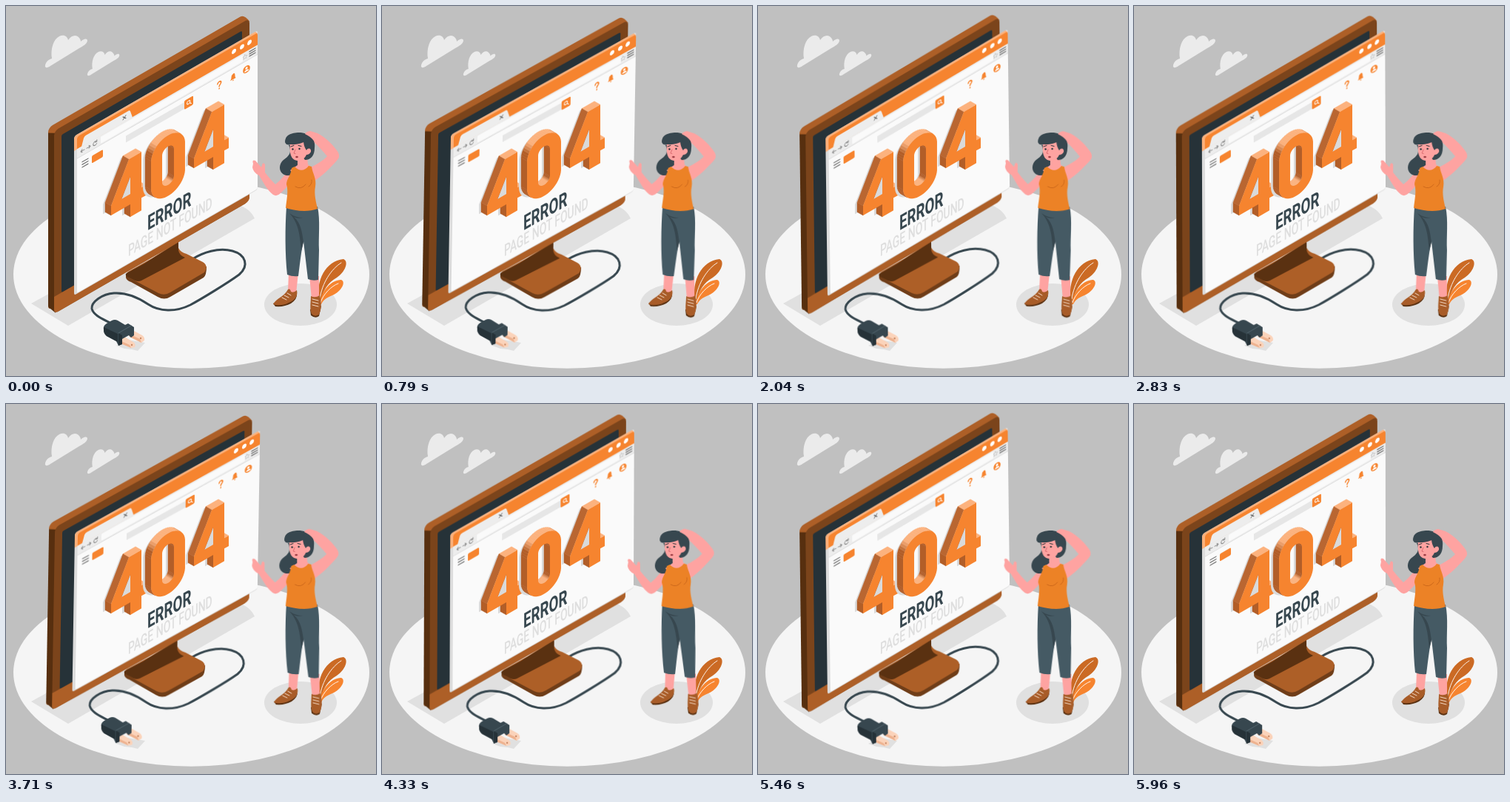
These frames come from a looping animation (500x500 px, 6 s). An HTML page:

```html
<!DOCTYPE html>
<html lang="en">
<head>
<meta charset="utf-8">
<title>404 error</title>
<style>
html, body { margin: 0; width: 100%; height: 100%; overflow: hidden; background: #c0c0c0; }
svg { display: block; width: 100vw; height: 100vh; }
text { font-family: Roboto, "Liberation Sans", sans-serif; }
.sway { transform-box: view-box; }
.line { fill: none; stroke-linecap: round; stroke-linejoin: round; }
</style>
</head>
<body>
<svg viewBox="0 0 500 500">
  <defs>
    <path id="cloud" fill="#ebebeb" d="M53 80C54 75 58 72 62 71C60 58 64 45 72 41C78 38 83 41 84 46C88 40 94 38 98 42C100 44 101 46 101 48C105 44 110 43 110 47C109 52 104 54 99 57L60 81C56 84 52 84 53 80Z"/>
  </defs>

  <ellipse cx="250.5" cy="362.7" rx="240.5" ry="127" fill="#f5f5f5"/>
  <use href="#cloud"/>
  <use href="#cloud" transform="translate(69.7 31) scale(.76)"/>
  <path fill="#e0e0e0" d="M34 402L290 262Q328 268 336 287L84 432Z"/>
  <path fill="#e0e0e0" d="M149 459L164 451L188 455L178 466L170 464L160 463Z"/>
  <ellipse cx="398" cy="403.5" rx="49" ry="28.5" fill="#e0e0e0"/>

  <!-- plant -->
  <path fill="#cb6a24" d="M423 398C418 372 432 344 456 342C464 345 458 360 447 367C435 374 428 384 426 398Z"/>
  <path fill="#f6842f" d="M424 403C426 384 440 370 453 370C460 373 453 386 441 391C433 394 428 398 426 403Z"/>
  <path class="line" stroke="#fff" stroke-width=".9" d="M424 396C427 374 440 355 453 347M425 401C428 390 440 378 449 375"/>

  <g class="sway" id="monitor">
    <!-- cable and plug -->
    <path class="line" stroke="#37474f" stroke-width="3" d="M252 342C266 333 287 326 306 331C324 336 329 351 315 363C300 374 264 396 249 404C229 414 207 413 192 403C176 392 162 387 146 388C130 389 115 400 116 409C118 418 131 423 142 429"/>
    <path fill="#fbd3ba" d="M166 441L171 438L184 445Q188 448 187 452L183 455L167 447ZM154 451L160 447L172 454Q176 457 174 461L169 462L155 456Z"/>
    <path fill="#eeb28f" d="M166 443L181 450L183 455L167 447ZM154 452L167 458L169 462L155 456Z"/>
    <g fill="#c98a66"><circle cx="182" cy="449" r="1.2"/><circle cx="170" cy="458" r="1.2"/></g>
    <path fill="#37474f" d="M132 437Q131 432 136 429L143 425Q147 423 151 425L161 431L165 429L173 434V445L169 448L166 445L157 450V457L152 459L149 453L136 446Q132 443 132 437Z"/>
    <path fill="#263238" d="M132 434L151 443V454L136 446Q132 443 132 437ZM152 442L157 445V457L152 459Z"/>
    <path class="line" stroke="#52646d" d="M152 442L169 432"/>

    <!-- stand -->
    <path fill="#6f3d18" d="M162 362V367Q163 371 169 373L205 393Q214 398 222 393L267 367Q271 364 271 352Z"/>
    <path fill="#ad5f27" d="M165 359L197 341L233 318V327Q236 333 244 335L266 346Q274 351 268 360L222 387Q214 392 206 388L166 367Q160 363 165 359Z"/>
    <path fill="#5a3111" d="M163 361L187 348L233 319V330Q234 337 242 340L183 371Q179 373 174 371L164 366Q160 363 163 361Z"/>

    <g id="screen"></g>
  </g>

  <g id="sign"></g>
  <text id="error" font-size="28" font-weight="700" fill="#37474f">ERROR</text>
  <text id="missing" font-size="22" font-weight="500" fill="#dedede">PAGE NOT FOUND</text>

  <g class="sway" id="woman">
    <!-- legs and shoes -->
    <path fill="#fea3a1" d="M382 360H395L392 389Q386 392 381 386ZM410 365H423L423 396H413Z"/>
    <path fill="#5a3111" d="M361 402L364 406Q376 407 385 402Q394 396 393 388ZM411 410L412 418Q418 423 423 419L426 405Z"/>
    <path fill="#a85c28" d="M361 403C365 395 377 392 381 383Q384 381 385 386Q389 388 393 384C395 392 390 398 382 401C375 405 366 405 361 403ZM412 392Q418 395 424 391C427 402 426 411 423 417Q417 421 413 416C410 409 412 400 412 392Z"/>
    <path class="line" stroke="#f6dcc8" stroke-width="1" d="M376 391L382 394M373 394L379 397M380 388L385 391M414 396L422 398M414 400L422 402M414 404L422 406"/>
    <path fill="#455a64" d="M379 271C391 277 409 277 421 271C425 290 422 312 423 330L422 370Q415 372 408 369L402 318C399 330 397 350 395 365Q387 366 380 363C377 335 377 300 379 271Z"/>
    <path fill="#37474f" d="M383 280Q391 286 401 286Q394 288 389 285C399 294 400 306 402 319L399 331C397 310 396 294 383 280Z"/>

    <!-- arms, back hair, torso -->
    <path fill="#fea3a1" d="M385 219C379 225 372 235 364 241C358 235 353 229 350 225L350 214Q347 210 346 215L345 218L337 209Q332 207 334 213L333 218Q334 225 342 229C348 239 354 250 361 255Q366 258 371 253C377 247 386 239 391 231Z"/>
    <path fill="#fea3a1" d="M408 220C416 216 429 209 434 203C429 197 421 188 416 184L407 178Q404 170 411 169L421 172C433 178 444 190 449 198Q452 204 447 209C438 219 427 230 416 237Z"/>
    <path fill="#37474f" d="M382 188C387 198 382 203 375 208C367 215 369 227 379 229C390 230 396 221 402 207L395 185Z"/>
    <path fill="#fea3a1" d="M394 204H407L408 214L415 220L411 228H389L384 222L394 215Z"/>
    <path fill="#ec8226" d="M386 219L390 217C396 224 404 223 409 216L413 217C414 226 420 233 418 244C416 254 419 265 421 274C408 279 391 277 378 273C379 262 382 250 379 241C379 234 385 229 386 219Z"/>
    <path class="line" stroke="#c9661a" stroke-width=".9" d="M391 244Q399 249 405 241M413 235Q414 241 409 244"/>

    <!-- head -->
    <path fill="#37474f" d="M378 183C376 175 386 171 396 171C410 171 419 180 417 192C417 202 412 208 404 208L390 190Z"/>
    <path fill="#fea3a1" d="M384 186C390 187 397 185 402 181C402 188 404 192 406 195C408 191 413 192 412 197Q410 201 406 201C403 208 396 211 390 208C384 205 383 196 384 186Z"/>
    <path fill="#37474f" d="M377 184C377 176 387 172 400 173L406 182Q397 188 384 187Q379 189 377 184Z"/>
    <path fill="#fea3a1" d="M404 173Q406 168 414 170L421 173L416 182Q411 176 404 173Z"/>
    <path class="line" stroke="#263238" stroke-width="1" d="M385 190L389 188.5M395 188.5L399 189.5"/>
    <g fill="#263238"><circle cx="387.5" cy="193.5" r="1.2"/><circle cx="396.5" cy="193" r="1.2"/></g>
    <path class="line" stroke="#d96b70" d="M391 194L389 199L391 199.5"/>
    <ellipse cx="393" cy="204" rx="1.8" ry="1.3" fill="#9c3c43"/>
  </g>
</svg>

<script>
const $ = id => document.getElementById(id);
const SLOPE = -0.577;
const ORANGE = '#f6842f', BROWN = '#ad5f27', GREY = '#8a8a8a';

// Flat drawing -> left-to-right rising wall
const wall = (x, y, sx = 1) => `matrix(${sx} ${SLOPE * sx} 0 1 ${x} ${y})`;
const rect = (x, y, w, h, fill, r = 0) =>
  `<rect x="${x}" y="${y}" width="${w}" height="${h}" rx="${r}" fill="${fill}"/>`;
const circle = (x, y, r, fill) => `<circle cx="${x}" cy="${y}" r="${r}" fill="${fill}"/>`;
const path = (d, fill) => `<path d="${d}" fill="${fill}" fill-rule="evenodd"/>`;
const line = (d, color, w = 1) =>
  `<path class="line" d="${d}" stroke="${color}" stroke-width="${w}"/>`;
const burger = (x, y, gap) =>
  line([0, 1, 2].map(i => `M${x} ${y + i * gap}h8`).join(''), '#707070', 1.3);

function body() {
  return `<g transform="${wall(65, 169)}">` +
    rect(-8, -9.2, 264, 247, BROWN, 6) +
    path('M-6 -7L252 -9.2Q257 -9 264 4L3 4Z', BROWN) +
    path('M-8 -2L2 4V247L-5 237Q-8 235 -8 231Z', '#572f0f') +
    rect(0, 0, 264, 247, '#7b441b', 6) +
    path('M0 224H264V241Q264 247 258 247H6Q0 247 0 241Z', BROWN) +
    rect(10, 11, 244, 213, '#263238', 2) + '</g>';
}

function browser() {
  return `<g transform="${wall(92, 176)}">` +
    rect(0, 0, 248, 215, '#dcdcdc', 3) +
    path('M0 20V4Q0 0 4 0H245L248 4H5V20Z', '#fbb07a') +
    path('M4 20H248V212Q248 214 245 214H6Q4 214 4 212Z', '#fafafa') +
    path('M4 20V6Q4 3 7 3H245Q248 3 248 6V20Z', ORANGE) +
    path('M10 20L13 10Q14 8 16 8H73Q75 8 76 10L79 20Z', '#ededed') +
    rect(4, 19.5, 244, 13, '#ededed') +
    rect(36, 21.5, 192, 9, '#fafafa', 1) +
    rect(4, 32, 244, .8, '#d6d6d6') +
    [216, 227, 237].map(x => circle(x, 10, 3, '#fff')).join('') +
    line('M66 12l4 4m0 -4l-4 4', '#666') +
    line('M14 26h-5l2 -2m-2 2l2 2M17 26h5l-2 -2m2 2l-2 2M30.5 24.5a2.6 2.6 0 1 0 .2 2.6M30.8 22.5v2.3h-2.3', GREY) +
    burger(237, 22.5, 3) +
    line('M231 23l1 2h2l-1.5 1.6l.5 2l-2 -1l-2 1l.5 -2l-1.5 -1.6h2z', '#c4c4c4', .7) +
    burger(11, 41, 3.6) +
    rect(24, 40.5, 15, 10, ORANGE, 1.5) +
    rect(70, 40, 80, 9, '#e6e6e6') +
    rect(149, 38, 12, 12, ORANGE, 1.5) +
    line('M156.8 43.5a2.1 2.1 0 1 0 -4.2 0a2.1 2.1 0 1 0 4.2 0M156.3 45l2 2', '#fff') +
    line('M194 41.5a2.3 2.3 0 1 1 3.6 2q-1.4 1 -1.4 2.2M196.2 48.6v.1', ORANGE, 1.8) +
    path('M211 47q1.5 -1 1.5 -4t2.5 -3.5t2.5 3.5t1.5 4zM213.7 48h2.6q-1.3 2.4 -2.6 0z', ORANGE) +
    circle(233, 44, 4.8, ORANGE) + circle(233, 42.4, 1.6, '#fff') +
    path('M230 47q0 -2.5 3 -2.5t3 2.5z', '#fff') + '</g>';
}

// Extruded digits: each outline edge sweeps back by BACK
const BACK = [-8, -9.2];
const LIGHT = [252, 178, 126], DARK = [178, 94, 40];

function oval(x, y, w, h) {
  const r = w / 2;
  return Array.from({ length: 48 }, (_, i) => {
    const a = (i + .5) / 24 * Math.PI;
    const cy = Math.sin(a) < 0 ? y + r : y + h - r;
    return [x + r + r * Math.cos(a), cy + r * Math.sin(a)];
  });
}

// Outer outline runs clockwise, hole counter-clockwise
const four = [
  [[24, 5], [41, 5], [41, 53], [47, 53], [47, 67], [41, 67], [41, 84], [26, 84], [26, 67], [0, 67], [0, 54]],
  [[26, 53], [26, 29], [14, 53]].reverse()
].map((pts, i) => i ? [pts[2], pts[0], pts[1]] : pts);
const zero = [oval(0, 3, 46, 82), oval(15, 18, 16, 52).reverse()];
const outline = pts => 'M' + pts.map(p => p.join(' ')).join('L') + 'Z';
const back = p => [p[0] + BACK[0], p[1] + BACK[1]];

function sides(pts) {
  return pts.map((a, i) => {
    const b = pts[(i + 1) % pts.length];
    const nx = b[1] - a[1], ny = a[0] - b[0];
    if (nx * BACK[0] + ny * BACK[1] <= 0) return '';
    const up = -ny / Math.hypot(nx, ny);
    const k = Math.min(1, Math.max(0, (up - .4) / .4));
    const color = `rgb(${DARK.map((d, j) => Math.round(d + (LIGHT[j] - d) * k))})`;
    return `<path d="${outline([a, b, back(b), back(a)])}" fill="${color}" stroke="${color}" stroke-width=".4"/>`;
  }).join('');
}

function digit(shape, x, y) {
  const face = shape.map(outline).join('');
  const shade = `<g transform="translate(-11 -8)">${path(face, '#dadada')}</g>`;
  return `<g transform="${wall(x, y)}">${shade}${shape.map(sides).join('')}${path(face, ORANGE)}</g>`;
}

$('screen').innerHTML = body() + browser();
$('sign').innerHTML = digit(four, 142, 216) + digit(zero, 196, 185) + digit(four, 254, 152);
$('error').setAttribute('transform', wall(191, 303.5, .67));
$('missing').setAttribute('transform', wall(165, 338.5, .635));

function sway(id, origin, duration) {
  const el = $(id);
  el.style.transformOrigin = origin;
  el.animate([
    { offset: 0, transform: 'rotate(0deg)' },
    { offset: .25, transform: 'rotate(1deg)' },
    { offset: .75, transform: 'rotate(-1deg)' },
    { offset: 1, transform: 'rotate(0deg)' }
  ], { duration, iterations: Infinity });
}
sway('monitor', '198px 238px', 3000);
sway('woman', '391px 295px', 6000);
</script>
</body>
</html>
```
